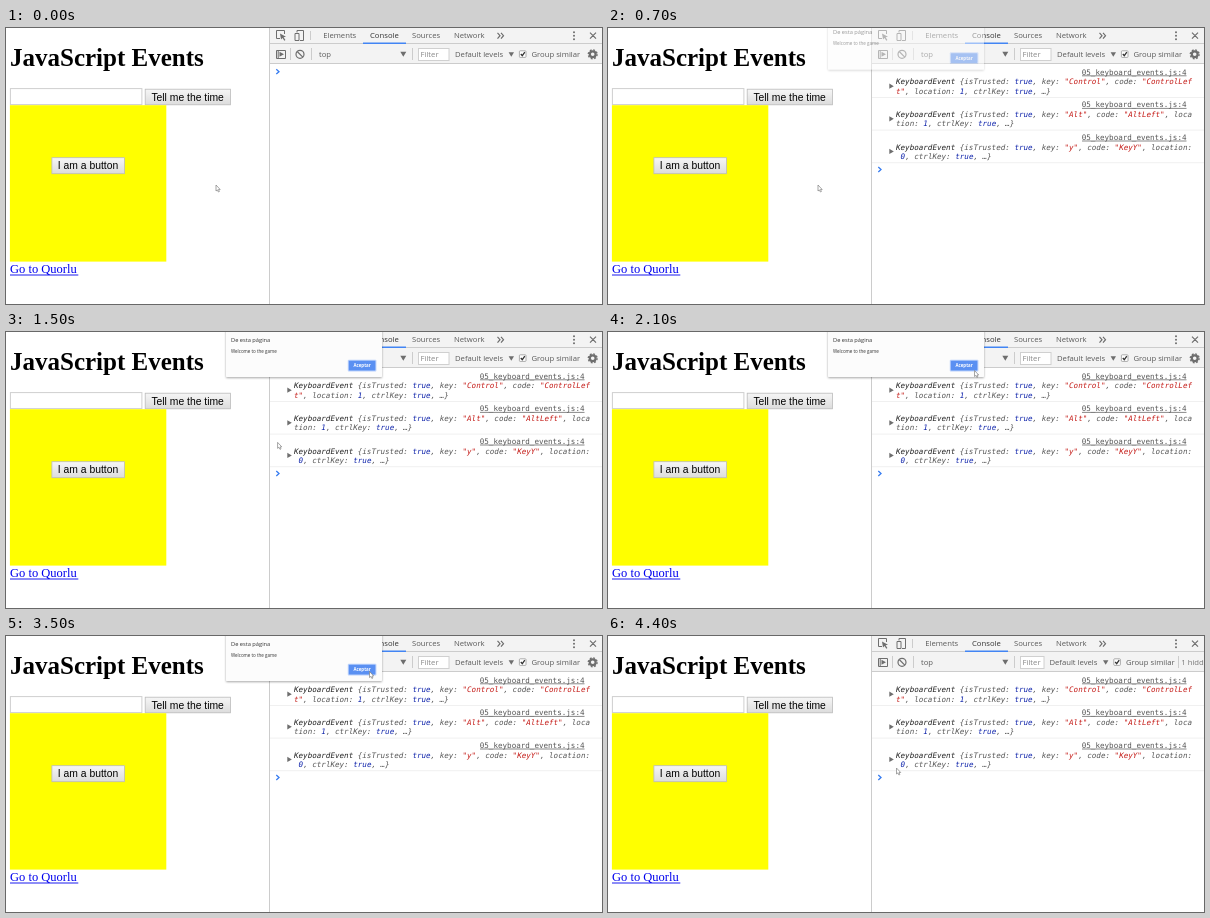
Write an HTML page that moves like this. It is 596x276 px and loops after 4500 ms.

```html
<!DOCTYPE html>
<html lang="en">
<head>
<meta charset="utf-8">
<title>JavaScript Events</title>
<style>
html, body { margin: 0; width: 100%; height: 100%; overflow: hidden; background: #fff; }
svg { display: block; }
text { white-space: pre; }
.serif { font-family: "Liberation Serif", serif; }
.sans { font: 10.35px "Liberation Sans", sans-serif; fill: #000; }
.ui { font: 7.7px "Open Sans", sans-serif; fill: #5a5a5a; }
.mono { font: 7.57px "DejaVu Sans Mono", monospace; fill: #565656; }
.log { font-style: italic; }
.icon { fill: none; stroke: #6e6e6e; stroke-width: 1; }
.solid { fill: #6e6e6e; }
.line { stroke: #ccc; stroke-width: 1; }
.btn { fill: url(#face); stroke: #bbb; stroke-width: .8; }
</style>
</head>
<body>
<svg width="596" height="276" viewBox="0 0 596 276">
  <defs>
    <linearGradient id="face" x2="0" y2="1">
      <stop stop-color="#f6f6f6"/><stop offset="1" stop-color="#dcdcdc"/>
    </linearGradient>
    <filter id="shade" x="-10%" y="-20%" width="120%" height="150%">
      <feDropShadow dx="0" dy="1" stdDeviation="1.3" flood-opacity=".35"/>
    </filter>
  </defs>
  <rect width="596" height="276" fill="#fff"/>

  <!-- page -->
  <text class="serif" x="4" y="38" font-size="25" font-weight="bold">JavaScript Events</text>
  <rect x="4.4" y="60.6" width="131.5" height="16" fill="#fff" stroke="#cfcfcf"/>
  <rect class="btn" x="139.2" y="61.2" width="85.2" height="15.6"/>
  <text class="sans" x="145.4" y="72.6">Tell me the time</text>
  <rect x="3.9" y="77.2" width="156.4" height="156.4" fill="#ff0"/>
  <rect class="btn" x="45.9" y="129.7" width="72.6" height="16"/>
  <text class="sans" x="51.8" y="141.2">I am a button</text>
  <text class="serif" x="4" y="245.3" font-size="12.5" fill="#00e">Go to Quorlu</text>
  <path d="M4 247H72.3" stroke="#00e" stroke-width=".9"/>

  <!-- developer tools -->
  <rect x="264" width="332" height="36" fill="#f3f3f3"/>
  <path class="line" d="M263.5 0V276M264 15.5H596M264 35.5H596M304.5 3V12M284.5 20V32M305.5 20V32M406.5 20V32"/>
  <path class="icon" d="M274 10.5H270.5V2.5H278.5V6M291 4.5V2.5H297.5V12.5H294M289 5.5H293V12.5H289Z"/>
  <path class="solid" d="M274 5.5L280 8.7L277.6 9.3L279.4 12L278.3 12.7L276.6 10L275 11.6Z"/>
  <g class="ui">
    <text x="317.2" y="10.3">Elements</text>
    <text x="364" y="10.3" fill="#333">Console</text>
    <text x="406" y="10.3">Sources</text>
    <text x="448" y="10.3">Network</text>
    <text x="313" y="29">top</text>
  </g>
  <path d="M357 15.3H400" stroke="#4285f4" stroke-width="1.4"/>
  <path class="icon" d="M491.5 4.8L494 7.7L491.5 10.6M495 4.8L497.5 7.7L495 10.6M584 4.7L590 10.7M590 4.7L584 10.7" style="stroke-width:1.2"/>
  <g class="solid">
    <circle cx="568" cy="4.2" r="1"/><circle cx="568" cy="7.7" r="1"/><circle cx="568" cy="11.2" r="1"/>
    <path d="M394.3 23.7H400.3L397.3 28.7ZM273.5 23.8L278 26.3L273.5 28.8Z"/>
  </g>
  <path class="icon" d="M270.5 22.5H279.5V30.5H270.5ZM272.2 22.5V30.5"/>
  <circle class="icon" cx="294" cy="26.3" r="4" style="stroke-width:1.2"/>
  <path class="icon" d="M291.2 23.5L296.8 29.1" style="stroke-width:1.2"/>
  <rect id="filter" x="412.5" y="20.5" width="30.5" height="12" fill="#fff" stroke="#d0d0d0"/>
  <text class="ui" x="414.5" y="29" style="fill:#888">Filter</text>
  <g id="options">
    <text class="ui" x="449" y="29">Default levels</text>
    <path class="solid" d="M502.6 24.3H508L505.3 28.8Z"/>
    <rect x="513.4" y="22.8" width="6.6" height="6.6" rx=".8" fill="#fff" stroke="#999" stroke-width=".8"/>
    <path d="M514.8 26L516.3 27.7L518.8 24.2" fill="none" stroke="#333" stroke-width="1.3"/>
    <text class="ui" x="525.5" y="29">Group similar</text>
  </g>
  <g id="gear" fill="none" stroke="#6e6e6e">
    <circle cx="586.7" cy="26.3" r="2.9" stroke-width="2.2"/>
    <circle cx="586.7" cy="26.3" r="4.4" stroke-width="1.4" stroke-dasharray="1.8 1.656"/>
  </g>
  <g id="hidden">
    <path class="line" d="M570.5 20V32"/>
    <text class="ui" x="573.3" y="29" style="fill:#777">1 hidden</text>
  </g>

  <g id="rows"></g>
  <path id="prompt" d="M270.3 41.3L273 43.7L270.3 46.1" fill="none" stroke="#367cf1" stroke-width="1.3"/>

  <g id="dialog">
    <rect x="220" y="-8" width="156" height="53" rx="1" fill="#fcfcfc" filter="url(#shade)"/>
    <g font-family="Open Sans, sans-serif" fill="#333">
      <text x="225" y="9.7" font-size="5.7">De esta página</text>
      <text x="225" y="20.8" font-size="4.5">Welcome to the game</text>
      <rect x="341.8" y="27.8" width="28.6" height="11.6" rx="1" fill="#b9d0fb"/>
      <rect x="342.8" y="28.8" width="26.6" height="9.6" rx=".6" fill="#5a90f2"/>
      <text x="356.1" y="35.2" font-size="4.4" font-weight="bold" text-anchor="middle" style="fill:#fff">Aceptar</text>
    </g>
  </g>
  <path id="cursor" d="M0 0V6L1.4 4.9L2.4 7L3.4 6.5L2.5 4.5H4.2Z" fill="#fff" stroke="#808080" stroke-width=".7"/>
</svg>
<script>
const LOOP = 4500, STEP = 100, PITCH = 32.6;
const $ = id => document.getElementById(id);

const logs = [
  { at: 200, lines: ['{isTrusted: true, key: "Control", code: "ControlLef', 't", location: 1, ctrlKey: true, …}'] },
  { at: 300, lines: ['{isTrusted: true, key: "Alt", code: "AltLeft", loca', 'tion: 1, ctrlKey: true, …}'] },
  { at: 700, lines: ['{isTrusted: true, key: "y", code: "KeyY", location:', ' 0, ctrlKey: true, …}'] }
];

// time, x, y of the pointer tip
const path = [[0, 210, 157], [1200, 210, 157], [1900, 366.5, 38.5], [2300, 366.5, 38.5],
  [2600, 363.5, 35.5], [3800, 363.5, 35.5], [4300, 288.5, 132], [LOOP, 288.5, 132]];
// time, opacity, vertical shift
const fade = [[0, 0, -7], [600, 0, -7], [800, 1, 0], [3700, 1, 0], [3800, .1, -6.5], [3900, 0, -7], [LOOP, 0, -7]];

const tint = s => s.replace(/^t"|"[^"]*"?|true|\b\d\b/g, m =>
  `<tspan fill="${m.includes('"') ? '#c41a16' : '#0d22aa'}">${m}</tspan>`);

$('rows').innerHTML = logs.map(({ lines }, i) => `<g transform="translate(0 ${i * PITCH})">
  <text class="mono" x="578.5" y="46.5" text-anchor="end">05_keyboard_events.js:4</text>
  <path d="M474 47.8H578.5" stroke="#565656" stroke-width=".7"/>
  <path class="solid" d="M281.3 55.6L285.8 58.2L281.3 60.8Z"/>
  <text class="mono log" x="288" y="56.4"><tspan fill="#222">KeyboardEvent </tspan>${tint(lines[0])}</text>
  <text class="mono log" x="288" y="65.8">${tint(lines[1])}</text>
  <path d="M264 69.5H596" stroke="#f0f0f0"/></g>`).join('');
const rows = [...$('rows').children];

const ease = p => p * p * (3 - 2 * p);
function sample(keys, t) {
  const i = keys.findIndex(k => k[0] > t), a = keys[i - 1], b = keys[i];
  const p = ease((t - a[0]) / (b[0] - a[0]));
  return [1, 2].map(n => a[n] + (b[n] - a[n]) * p);
}
const show = (el, on) => el.setAttribute('visibility', on ? 'visible' : 'hidden');
const move = (el, x, y) => el.setAttribute('transform', `translate(${x} ${y})`);

function draw(now) {
  const t = Math.floor(now % LOOP / STEP) * STEP;
  rows.forEach((row, i) => show(row, t >= logs[i].at));
  move($('prompt'), 0, PITCH * logs.filter(l => t >= l.at).length);

  const narrow = t >= 3800;
  $('filter').setAttribute('width', narrow ? 23.5 : 30.5);
  move($('options'), narrow ? -7.6 : 0, 0);
  show($('gear'), !narrow);
  show($('hidden'), narrow);

  const [alpha, shift] = sample(fade, t);
  $('dialog').setAttribute('opacity', alpha);
  move($('dialog'), 0, shift);
  move($('cursor'), ...sample(path, t));
}

const start = performance.now();
function tick() {
  draw(performance.now() - start);
  requestAnimationFrame(tick);
}
tick();
</script>
</body>
</html>
```
